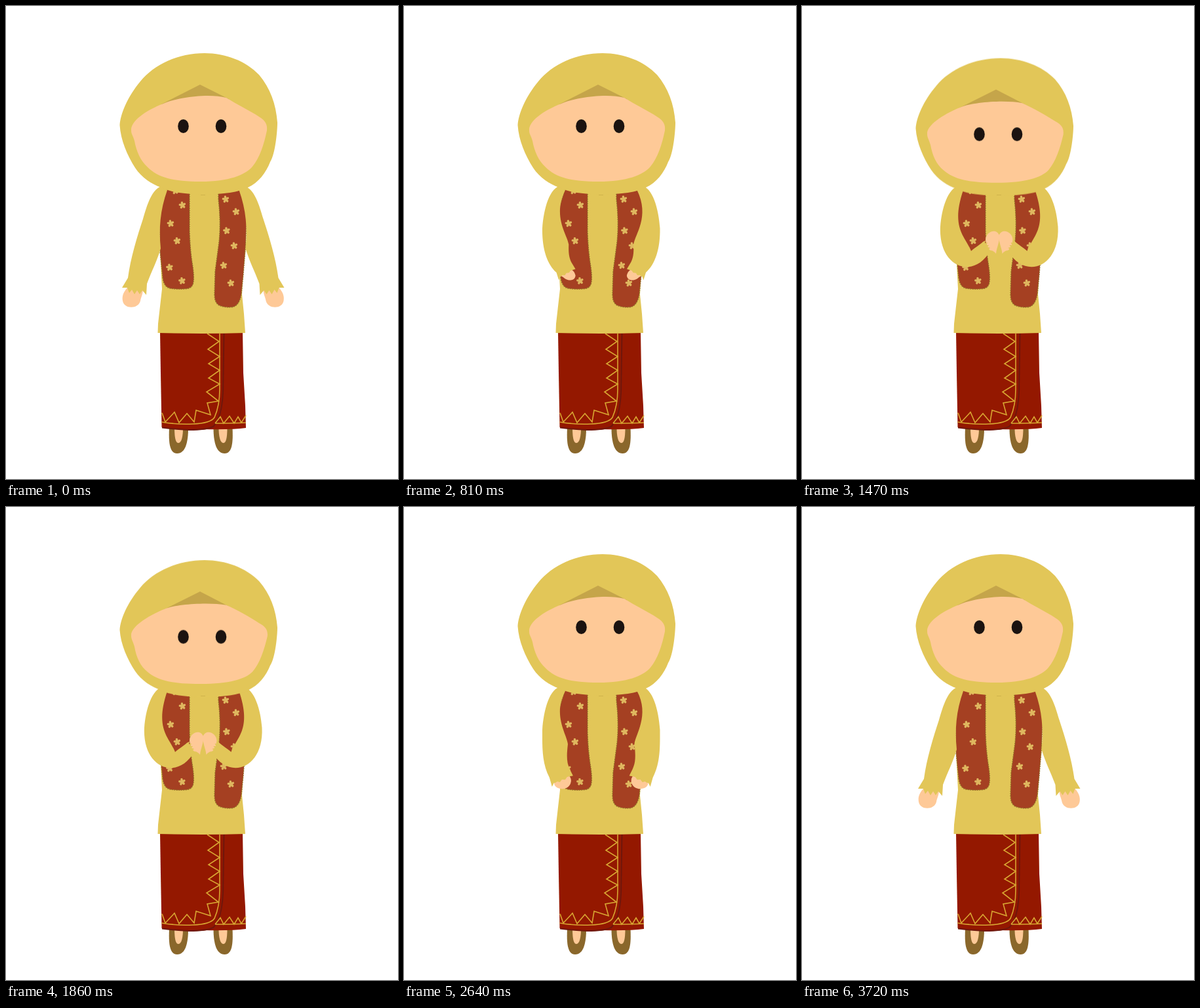
Recreate the animation shown at these times as an HTML page. Size 598x722 px, loop 3750 ms.

```html
<!DOCTYPE html>
<html lang="en">
<head>
<meta charset="utf-8">
<title>Greeting bow</title>
<style>
html, body { margin: 0; width: 100%; height: 100%; overflow: hidden; background: #fff; }
svg { display: block; width: 100vw; height: 100vh; }
.cloth { fill: #e2c658; }
.skin { fill: #fec997; }
.vest { fill: #a54022; stroke: #8f6f28; stroke-width: 1.3; stroke-dasharray: 2 1.5; }
.trim { fill: none; stroke: #d8a632; stroke-width: 1.6; }
.flowers { fill: none; stroke: #dfb75f; stroke-width: 3.4; stroke-linecap: round; }
.sleeve, .hand, .hood, .peak, .face, .gaze, .eye { animation: 3750ms linear infinite; }

/* Arms: swing in, fold, hold, unfold, swing out */
.sleeve { animation-name: sleeve; }
@keyframes sleeve {
  0%, 4%, 89.6%, 100% {
    d: path("M240 274C222 278 215 305 209 325C200 352 190 385 186 415L177 430L185 430L188 438L192 433L196 440L200 434L204 440L208 434L214 441L215 424C222 405 231 388 236 370C233 340 235 312 246 281Z");
  }
  4% { animation-timing-function: cubic-bezier(.333, 0, .667, .333); }
  17.2%, 75.2% {
    d: path("M240 274C224 278 219 305 215 325C210 352 204 385 200 415L195 432L202 433L205 440L209 435L213 442L217 435L221 441L225 434L231 440L231 424C235 405 242 385 246 362C242 345 236 312 246 281Z");
  }
  75.2% { animation-timing-function: cubic-bezier(.333, .667, .667, 1); }
  20.4%, 70.4% {
    d: path("M240 274C222 276 213 310 211 340C211 365 210 390 222 413L226 427L229 421L231 421L234 419L238 420L241 416L246 416L249 412L258 410L253 400C248 390 248 380 250 362C249 348 226 318 246 281Z");
  }
  28%, 59.73% {
    d: path("M240 274C222 278 213 310 211 337C208 400 262 418 287 374L289 375L285 371L287 369L283 368L285 365L281 365L283 361L279 362L280 358L276 360C272 364 265 368 258 374C250 352 226 340 246 281Z");
  }
}
.hand { animation-name: hand; }
@keyframes hand {
  0%, 4%, 89.6%, 100% {
    d: path("M185 430C178 438 177 444 178 450C180 463 202 463 205 450C206 444 209 440 209 432Z");
  }
  4% { animation-timing-function: cubic-bezier(.333, 0, .667, .333); }
  17.2%, 75.2% {
    d: path("M203 431C196 438 196 446 197 451C200 466 221 466 224 451C224 444 224 440 224 432Z");
  }
  75.2% { animation-timing-function: cubic-bezier(.333, .667, .667, 1); }
  20.4%, 70.4% {
    d: path("M229 420C229 424 231 427 235 429C243 432 254 429 255 418C255 414 254 411 250 408Z");
  }
  28%, 59.73% {
    d: path("M280 357C280 345 296 338 301 350C302 360 297 368 296 378C290 371 287 374 283 372Z");
  }
}

/* Bow */
.hood, .peak, .face, .gaze { animation-timing-function: ease-in-out; }
.hood { animation-name: hood; transform-origin: 0 288px; }
@keyframes hood {
  0%, 30%, 60%, 100% { transform: none; }
  45.2% { transform: translateY(3px) scaleY(.962); }
}
.peak { animation-name: peak; }
@keyframes peak {
  0%, 30%, 60%, 100% { d: path("M237 150L296 120L340 142L300 170Z"); }
  45.2% { d: path("M240 159L296 131L340 154L300 175Z"); }
}
.face { animation-name: face; }
@keyframes face {
  0%, 30%, 60%, 100% {
    d: path("M191 190C190 176 212 160 240 149C262 139 310 133 336 140C352 150 374 161 386 169C396 175 399 181 398 190C394 210 387 232 376 245C365 258 340 268 297 268C255 268 232 262 216 246C205 236 199 222 196 206C194 198 191 196 191 190Z");
  }
  45.2% {
    d: path("M191 198C190 186 212 170 243 157C262 150 310 148 336 152C352 158 374 171 386 179C396 184 400 189 399 199C394 220 387 241 376 253C365 264 340 270.5 297 270.5C255 270.5 232 266 216 253C205 245 199 232 196 215C194 207 191 204 191 198Z");
  }
}
.gaze { animation-name: gaze; }
@keyframes gaze {
  0%, 30%, 60%, 100% { transform: none; }
  45.2% { transform: translateY(18px); }
}
.eye { animation-name: blink; transform-origin: 0 183.5px; fill: #1b1310; }
@keyframes blink {
  0%, 4%, 8%, 85.6%, 89.6%, 100% { transform: none; }
  6%, 87.6% { transform: scaleY(.1); }
}
</style>
</head>
<body>
<svg viewBox="0 0 598 722" preserveAspectRatio="none">
  <defs>
    <path id="flower" d="M0 0L-.6-3.800M0 0L3.400-1.700M0 0L2.700 2.700M0 0L-1.700 3.400M0 0L-3.700-.6"/>
    <g id="shoe">
      <path fill="#8a672b" d="M249 644C248 665 249 683 261 683C274 683 278 665 278 644Z"/>
      <path class="skin" d="M257 644C257 660 259 667 263 667C268 667 270 656 270 644Z"/>
    </g>
  </defs>

  <use href="#shoe"/>
  <use href="#shoe" transform="matrix(-1 0 0 1 594.5 0)"/>

  <!-- Skirt -->
  <path fill="#941800" d="M320 497H361L362 560L365 610L366 644Q345 647 300 646Z"/>
  <path fill="#941800" d="M235 497L236 560L237.500 643Q260 647 290 647Q312 647 320 641Q331 630 332 590L333 497Z"/>
  <path fill="none" stroke="#6f170c" stroke-width="2" d="M332.500 499L331 590Q329 630 316 642Q305 647 280 647Q255 646 238 643.500"/>
  <path class="trim" d="M326 500V585Q326 610 318 628Q312 637 285 638Q260 639 237.500 635"/>
  <path class="trim" d="M307 500L325 512L308 524L326 535L309 546L326 556L309 568L326 577L306 589L324 603L307 606L312 624L290 617L287 635L276 622L264 636L257 620L243 635L238 621"/>
  <path class="trim" d="M319 637Q345 637 366 636M319 637L327 627L332 637L341 626L348 637L354 627L359 636L366 625"/>

  <!-- Tunic and vest -->
  <path class="cloth" d="M238 272C238 320 234 350 235 375L238 432L232 485L231.500 499Q300 501 365 499L363 470L360 440L362 405L366 370C367 340 364 300 362 272Z"/>
  <path class="vest" d="M247 274L280 278V345Q281 375 285 398Q287 412 286 421Q285 430 277 431.500Q262 433 250 431Q241 429 239 415L235 375L234 328Q235 310 244 285Z"/>
  <path class="vest" d="M324 278L355 274L360 288Q367 308 367 330L365.500 365L362 410L359 440Q356 457 346 459.500Q334 461 325 457Q318 453 318 440L319 405L325 360Q328 330 324 295Z"/>
  <g class="flowers">
    <use href="#flower" x="258" y="282"/>
    <use href="#flower" x="269" y="304"/>
    <use href="#flower" x="251" y="332"/>
    <use href="#flower" x="261" y="358.500"/>
    <use href="#flower" x="249.500" y="399"/>
    <use href="#flower" x="268.500" y="419.500"/>
    <use href="#flower" x="335" y="295"/>
    <use href="#flower" x="351" y="314"/>
    <use href="#flower" x="336.500" y="343"/>
    <use href="#flower" x="348" y="366"/>
    <use href="#flower" x="332" y="396"/>
    <use href="#flower" x="343" y="423"/>
  </g>

  <!-- Arms -->
  <g>
    <path class="hand skin"/>
    <path class="sleeve cloth"/>
  </g>
  <g transform="matrix(-1 0 0 1 601.500 0)">
    <path class="hand skin"/>
    <path class="sleeve cloth"/>
  </g>

  <!-- Head -->
  <path class="hood cloth" d="M303 72C263 72 226 89 205 115C185 139 174.500 165 173.500 182C175 205 185 228 197 247C207 262 222 272 237 277C260 291 345 291 369 277C385 270 397 254 403 238C411 226 414 190 414 178C412 150 403 125 386 105C366 84 335 72 303 72Z"/>
  <path fill="none" stroke="#d0b44c" d="M297 288.500H304"/>
  <path class="peak" fill="#c5a54a"/>
  <path class="face skin"/>
  <g class="gaze">
    <ellipse class="eye" cx="270.500" cy="183.500" rx="8.300" ry="10.500"/>
    <ellipse class="eye" cx="328" cy="183.500" rx="8.300" ry="10.500"/>
  </g>
</svg>
</body>
</html>
```
